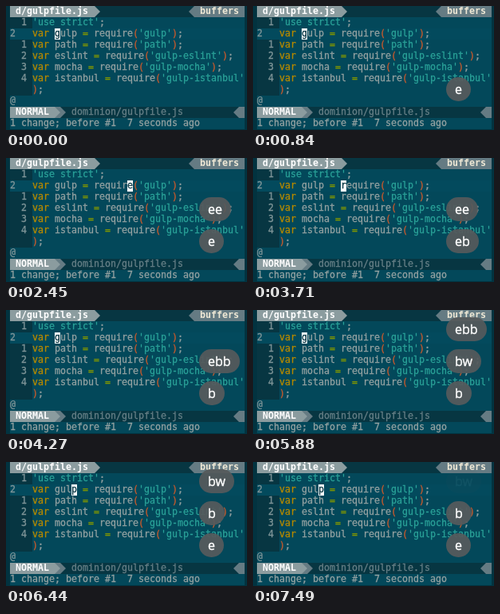
Animation, 302 px wide and 155 px high, one loop 7.77 s. Source, as an HTML page:

```html
<!DOCTYPE html>
<html lang="en">
<head>
<meta charset="utf-8">
<title>Word motions</title>
<style>
html, body { margin: 0; width: 100%; height: 100%; overflow: hidden; background: #023340; }
#stage { position: relative; width: 302px; height: 155px; overflow: hidden;
  font: 11.63px/14px "DejaVu Sans Mono", monospace; color: #93a1a1; -webkit-text-stroke: .3px; }
#stage div, pre { position: absolute; margin: 0; white-space: pre; font-family: inherit; }
#code { left: 5px; top: 13px; }
.panel { left: 5px; top: 0; width: 294px; height: 154px; background: #03485a; }
.bar { left: 5px; width: 294px; height: 14px; background: #073642; }
.gutter { left: 5px; top: 14px; width: 28px; height: 98px; background: #073642; }
.line { left: 5px; top: 28px; width: 294px; height: 14px; background: #034a5d; }
.tab { height: 14px; line-height: 12px; background: #8b9c9f; color: #fff;
  font-weight: bold; -webkit-text-stroke: 0; }
#stage .dim { background: #657b83; color: #eee8d5; }
.right { clip-path: polygon(0 0, calc(100% - 7px) 0, 100% 50%, calc(100% - 7px) 100%, 0 100%); }
.left { clip-path: polygon(7px 0, 100% 0, 100% 100%, 7px 100%, 0 50%); }
.path { color: #657f86; }
.num { color: #7f9598; }
.str { color: #2aa198; }
.key { color: #b58900; }
.op { color: #859900; }
.paren { color: #cb5a2c; }
#cursor { top: 28px; width: 7px; height: 14px; line-height: 12px; background: #fff; color: #073642; }
#stage .bubble { left: 242px; height: 30px; padding: 0 11px; border-radius: 15px;
  background: rgba(86, 90, 92, .93); color: #fff; -webkit-text-stroke: .4px;
  font: 16px/30px "Open Sans", "Noto Sans", sans-serif; }
</style>
</head>
<body>
<div id="stage">
  <div class="panel"></div>
  <div class="gutter"></div>
  <div class="line"></div>
  <div class="bar" style="top:0"></div>
  <div class="tab right" style="left:5px;top:0;width:113px"> d/gulpfile.js</div>
  <div class="tab left dim" style="left:229px;top:0;width:70px">  buffers</div>
  <pre id="code"></pre>
  <div class="bar" style="top:126px"></div>
  <div class="tab right dim" style="left:5px;top:126px;width:70px"></div>
  <div class="tab right" style="left:5px;top:126px;width:63px"> NORMAL</div>
  <div class="tab left dim" style="left:285px;top:126px;width:14px"></div>
  <div class="path" style="left:82px;top:125px">dominion/gulpfile.js</div>
  <div style="left:5px;top:139px">1 change; before #1  7 seconds ago</div>
  <div id="cursor"></div>
  <div class="bubble"></div>
  <div class="bubble"></div>
  <div class="bubble"></div>
</div>
<script>
const LOOP = 7770, STEP = 70, LAST = 7490;
const editLine = "var gulp = require('gulp');";
const rows = [
  "  1 'use strict';",
  "2   " + editLine,
  "  1 var path = require('path');",
  "  2 var eslint = require('gulp-eslint');",
  "  3 var mocha = require('gulp-mocha');",
  "  4 var istanbul = require('gulp-istanbul'",
  "    );",
  "@"
];

// time, key, cursor column afterwards, starts a new bubble
const strokes = [
  [840, "e", 7, true], [1750, "e", 9], [2380, "e", 17, true],
  [3710, "b", 11], [3850, "b", 9], [4270, "b", 4, true],
  [5250, "w", 9], [5880, "b", 4, true], [6370, "e", 7, true]
];

const span = (name, text) => `<span class="${name}">${text}</span>`;
const names = ["num", "str", "key", "op", "paren"];
const paint = row => row.replace(/(^ *\d|^@)|('[^']*')|(\bvar\b)|(=)|([()])/g,
  (text, ...groups) => span(names[groups.findIndex((g, i) => i < 5 && g)], text));

document.getElementById("code").innerHTML = rows.map(paint).join("\n");
const cursor = document.getElementById("cursor");
const bubbles = document.querySelectorAll(".bubble");

function draw(t) {
  let column = 4;
  const groups = [];
  for (const [time, key, target, fresh] of strokes) {
    if (t < time) break;
    if (fresh) groups.unshift({ text: "" });
    groups[0].text += key;
    groups[0].time = time;
    // forward-to-end moves land one step after their bubble
    if (t >= time + (key === "e" ? STEP : 0)) column = target;
  }
  cursor.style.left = 33 + column * 7 + "px";
  cursor.textContent = editLine[column];
  bubbles.forEach((bubble, i) => {
    const group = groups[i];
    bubble.style.display = group ? "block" : "none";
    if (!group) return;
    bubble.textContent = group.text;
    bubble.style.top = 89 - 40 * i + "px";
    const fade = (t - group.time - 2050) / 200;
    bubble.style.opacity = fade < 0 ? 1 : Math.max(0, 1 - fade);
  });
}

const start = performance.now();
function tick() {
  const t = (performance.now() - start) % LOOP;
  draw(Math.min(LAST, Math.floor(t / STEP) * STEP));
  requestAnimationFrame(tick);
}
tick();
</script>
</body>
</html>
```
